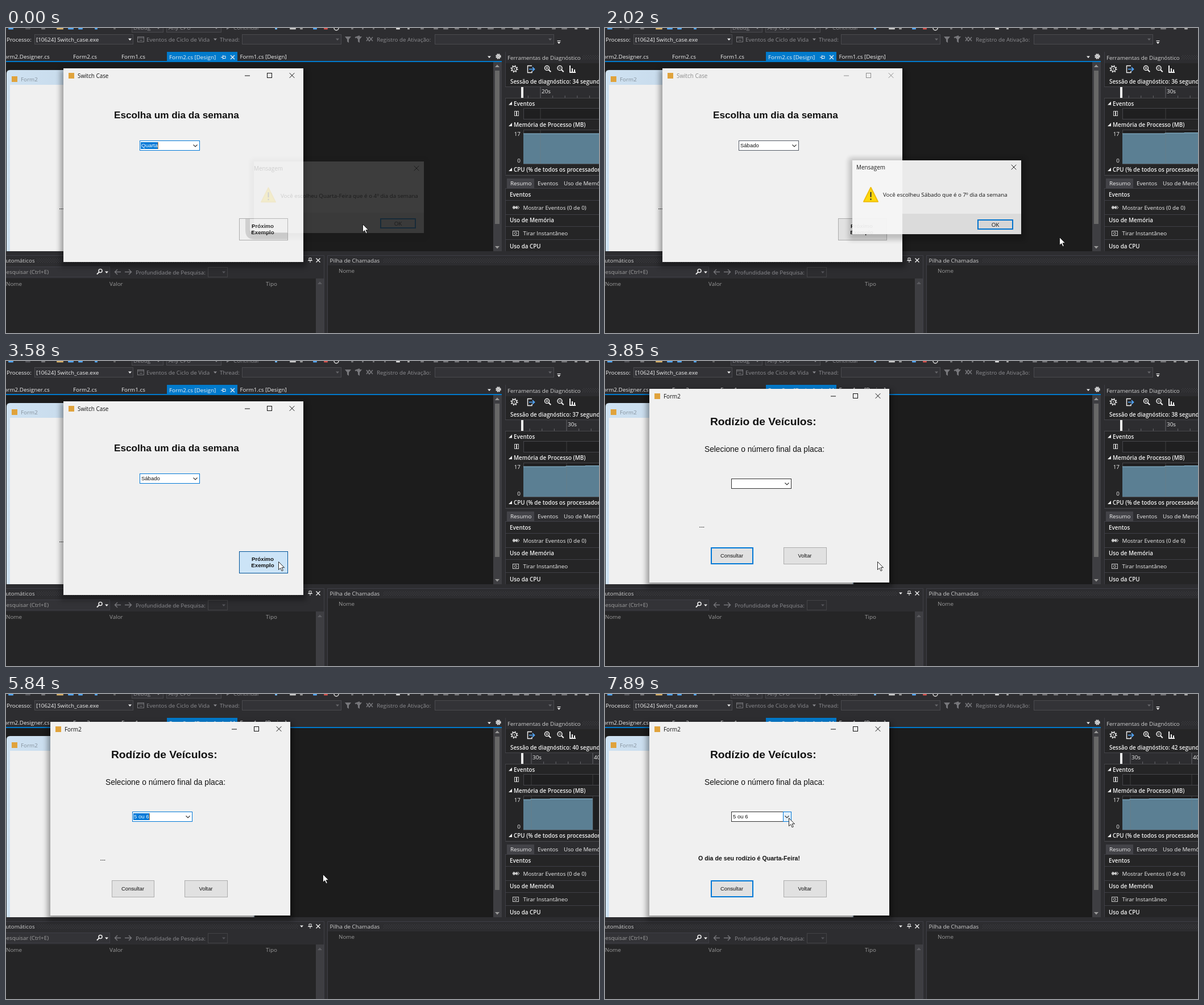
Animation of 1043 by 537 pixels, one loop 8000 ms. Source, as an HTML page:

```html
<!DOCTYPE html>
<html lang="pt">
<head>
<meta charset="utf-8">
<style>
html, body { margin: 0; width: 100%; height: 100%; overflow: hidden; background: #2d2d30; }
svg { display: block; }
text { font-family: "Open Sans", "Noto Sans", sans-serif; white-space: pre; }
.b { font-weight: 600; }
.f { font-family: "Liberation Sans", Arial, sans-serif; }
.fb { font-family: "Liberation Sans", Arial, sans-serif; font-weight: 700; }
</style>
</head>
<body>
<svg id="stage" width="1043" height="537" viewBox="0 0 1043 537">
  <defs>
    <filter id="soft" x="-20%" y="-20%" width="140%" height="140%"><feGaussianBlur stdDeviation="5"/></filter>
    <pattern id="dots" width="4" height="4" patternUnits="userSpaceOnUse">
      <path d="M0 0h1v1h-1zM2 2h1v1h-1z" fill="#46464a"/>
    </pattern>
    <linearGradient id="aero" x2="1"><stop stop-color="#cfe2f2"/><stop offset="1" stop-color="#b4c8da"/></linearGradient>
  </defs>
  <g id="ide"></g>
  <g id="live"></g>
</svg>
<script>
const LOOP = 8000, BLUE = '#0078d7', DIM = '#8c8c90', PALE = '#f1f1f1';
const steps = [0, 120, 240, 390, 510, 660, 780, 930, 1080, 1200, 1320,
  1600, 1720, 1870, 2020, 2140, 2260, 2380, 2500,
  2650, 2800, 2920, 3070, 3190, 3340, 3460, 3580,
  3700, 3850, 4000, 4150, 4290, 4410, 4560, 4680, 4830, 4980, 5130,
  5540, 5690, 5840, 5960, 6110, 6260, 6380, 6530,
  6650, 6770, 6920, 7070, 7220, 7340, 7480, 7610, 7740, 7890];
const pointer = [[0, 627, 345], [240, 585, 327], [660, 350, 214], [780, 336, 206], [930, 334, 208],
  [1080, 328, 245], [1320, 318, 290], [1600, 318, 291], [2020, 799, 368], [2500, 690, 347],
  [2650, 668, 348], [3100, 530, 360], [3580, 479, 353], [3850, 479, 353], [4410, 330, 218],
  [4560, 326, 215], [4680, 326, 213], [5130, 324, 254], [5540, 326, 256], [5840, 557, 317],
  [6530, 236, 343], [6770, 236, 343], [7480, 330, 222], [7890, 323, 218]];
const secondMarks = [930, 1720, 2800, 3850, 4680, 5690, 6650, 7610];
const days = ['Domingo', 'Segunda', 'Terça', 'Quarta', 'Quinta', 'Sexta', 'Sábado'];
const plates = ['1 ou 2', '3 ou 4', '5 ou 6', '7 ou 8', '9 ou 10'];

const rect = (x, y, w, h, fill, more = '') =>
  `<rect x="${x}" y="${y}" width="${w}" height="${h}" fill="${fill}" ${more}/>`;
const box = (x, y, w, h, fill, stroke, sw = 1) =>
  rect(x + sw / 2, y + sw / 2, w - sw, h - sw, fill, `stroke="${stroke}" stroke-width="${sw}"`);
const line = (d, stroke = PALE, sw = 1) => `<path d="${d}" fill="none" stroke="${stroke}" stroke-width="${sw}"/>`;
const shape = (d, fill = PALE) => `<path d="${d}" fill="${fill}"/>`;
const text = (x, y, s, fill = PALE, size = 9.85, cls = '', more = '') =>
  `<text x="${x}" y="${y}" fill="${fill}" font-size="${size}" class="${cls}" ${more}>${s}</text>`;
const middle = 'text-anchor="middle"';
const down = (x, y, fill = PALE) => shape(`M${x - 3} ${y - 1.5}h6l-3 3.5z`, fill);
const up = (x, y, fill = PALE) => shape(`M${x - 4} ${y + 2}h8l-4-4.5z`, fill);
const cross = (x, y, r, c, sw = 1) => line(`M${x - r} ${y - r}l${2 * r} ${2 * r}M${x + r} ${y - r}l${-2 * r} ${2 * r}`, c, sw);
const gear = (x, y, r) => `<circle cx="${x}" cy="${y}" r="${r}" fill="none" stroke="${PALE}" stroke-width="1.4"/>` +
  `<circle cx="${x}" cy="${y}" r="${r + 1.6}" fill="none" stroke="${PALE}" stroke-width="1.8" stroke-dasharray="2 ${(r + 1.6) * Math.PI / 4 - 2}"/>` +
  `<circle cx="${x}" cy="${y}" r="1" fill="${PALE}"/>`;
const lens = (x, y, r = 3.5, dir = 1) => `<circle cx="${x}" cy="${y}" r="${r}" fill="none" stroke="${PALE}" stroke-width="1.5"/>` +
  line(`M${x + dir * r * .7} ${y + r * .7}l${dir * 4} 4`, PALE, 2);
const pin = (x, y) => line(`M${x - 2} ${y - 4}h4v4h-4zM${x - 4} ${y + .5}h8M${x} ${y}v4`);
const appIcon = (x, y) => rect(x, y, 10, 10, '#e0a33c');

function toolbar() {
  const bits = [[4, 9, '#55aaff'], [34, 9, '#55555a'], [62, 7, '#77777a'], [89, 12, '#d9b36c'], [109, 10, '#55aaff'],
    [127, 8, '#55aaff'], [156, 5, '#55aaff'], [189, 4, '#666'], [473, 4, '#75beff'], [499, 11, '#ccc'], [517, 5, '#999'],
    [540, 7, '#55aaff'], [559, 7, '#d9534f'], [607, 4, '#77777a'], [626, 3, '#77777a'], [645, 3, '#77777a'], [665, 3, '#77777a'],
    [686, 7, '#ddd'], [706, 4, '#aaa'], [729, 6, '#77777a'], [752, 8, '#77777a'], [769, 9, '#77777a'], [789, 8, '#77777a'],
    [811, 3, '#77777a'], [829, 7, '#77777a'], [847, 11, '#77777a'], [871, 7, '#77777a'], [891, 12, '#88888b'],
    [911, 9, '#88888b'], [931, 8, '#88888b'], [960, 7, '#77777a'], [977, 10, '#77777a'], [1000, 5, '#999'], [1019, 6, '#aaa']];
  const combo = (x, w, y = 11, h = 18) => box(x, y, w, h, '#333337', '#4a4a4e');
  const funnel = x => shape(`M${x - 5} 15h11l-4 5v6l-3-2v-4z`, '#77777b');
  return bits.map(([x, w, c]) => rect(x, 0, w, 2.5, c, 'rx="1"')).join('') +
    '<circle cx="581" cy="0" r="4" fill="none" stroke="#ddd" stroke-width="1.5"/>' +
    combo(221, 56, -10) + text(224, 3, 'Debug', DIM) + combo(282, 97, -10) + text(286, 3, 'Any CPU', DIM) +
    down(268, 0, DIM) + down(370, 0, DIM) + shape('M388-3l5 3-5 3z', '#77777b') + text(400, 3, 'Continuar', DIM) +
    text(1, 23.5, 'Processo:') + combo(50, 174) + text(53, 23.5, '[10624] Switch_case.exe') + down(218, 20) +
    box(231, 15, 12, 10, 'none', '#77777b') + line('M231 17.5h12M235 21.5h5', '#77777b') +
    text(247, 23.5, 'Eventos de Ciclo de Vida', DIM) + down(368, 20, DIM) + text(376, 23.5, 'Thread:', DIM) +
    combo(415, 175) + down(583, 20, '#66666a') + funnel(601) + funnel(620) + line('M614 17l8-3', '#77777b', 2) +
    line('M634 16l5 7 6-7M634 23l5-7 6 7', '#77777b', 1.5) + text(652, 23.5, 'Registro de Ativação:', DIM) +
    combo(754, 210) + down(957, 20, '#66666a') + line('M969.5 22.5h6', PALE) + down(972.5, 26);
}

function editor() {
  return rect(0, 60, 857, 333, '#1c1c1c') + rect(0, 58, 872, 2, '#007acc') +
    text(-3.5, 54, 'orm2.Designer.cs') + text(118, 54, 'Form2.cs') + text(203, 54, 'Form1.cs') +
    rect(283, 42, 124, 17, '#007acc') + text(287, 54.5, 'Form2.cs [Design]') +
    line('M378 51.5h3M381.5 48v7M382 49.5h4v4h-4') + cross(398.5, 51.5, 3.5, PALE, 1.3) +
    text(411.5, 54, 'Form1.cs [Design]') + down(850, 51) + gear(866, 50, 2.2) +
    rect(857, 60, 15, 333, '#3e3e42') + rect(860, 75, 8, 270, '#686868') + up(864, 67, '#999') +
    shape('M860 384h8l-4 4.5z', '#999') +
    '<path d="M1 393V80q0-6 6-6h424q6 0 6 6v313z" fill="url(#aero)"/>' +
    rect(7, 100, 428, 293, '#f0f0f0') + appIcon(10, 85) + text(26, 94, 'Form2', '#85919c') +
    line('M94 318.5h7', '#333', 1).replace('/>', ' stroke-dasharray="2 1"/>');
}

function bottomPanels() {
  return rect(0, 400, 560, 137, '#2d2d30') + rect(0, 458, 545, 79, '#252526') + rect(0, 441, 545, 17, '#252526') +
    rect(566, 418, 477, 119, '#252526') + line('M0 400.5h559.5v137M565.5 537v-136.5h478', '#3f3f46') +
    text(-7, 413, 'Automáticos', '#d0d0d0') + rect(54, 406, 460, 7, 'url(#dots)') + down(520, 409) +
    pin(535, 409) + cross(549, 409, 3.5, PALE, 1.4) +
    box(-2, 420, 185, 19, '#333337', '#3f3f46') + text(-5.5, 433, 'Pesquisar (Ctrl+E)', '#a0a0a0') +
    lens(166, 427.5, 3, -1) + down(177, 430) +
    line('M202 429.5h-10M196 425l-4.500 4.500 4.500 4.500M209 429.500h11M216 425l4.500 4.500-4.500 4.500', '#77777b', 1.4) +
    text(228, 433.5, 'Profundidade de Pesquisa:', DIM) + box(355, 421, 35, 18, '#2d2d30', '#434346') + down(383, 430, '#55555a') +
    text(0, 453.5, 'Nome', '#999') + text(182, 453.5, 'Valor', '#999') + text(457, 453.5, 'Tipo', '#999') +
    rect(545, 441, 14, 96, '#3e3e42') + up(552, 449, '#5c5c60') +
    text(569.5, 413, 'Pilha de Chamadas', '#d0d0d0') + rect(664, 406, 379, 7, 'url(#dots)') + text(585, 430.5, 'Nome', '#999');
}

function diagnostics() {
  const head = (y, s) => shape(`M890 ${y - 3.5}v6h-6z`) + text(893, y + 3.5, s, PALE, 9.85, 'b');
  return rect(878, 42, 165, 351, '#252526') + rect(878, 42, 165, 20, '#2d2d30') + line('M878.5 42v351', '#3f3f46') +
    text(882, 55.5, 'Ferramentas de Diagnóstico', '#d0d0d0') + rect(1014, 48, 29, 7, 'url(#dots)') +
    gear(894, 72, 4) + line('M925 66.500h-7.500v12h7.500v-3', PALE, 1.4) + line('M920 72.500h9M926 69l3.500 3.500-3.500 3.500', '#55aaff', 1.7) +
    lens(951.5, 70.5, 4) + line('M949.500 70.500h4M951.500 68.500v4') + lens(974, 70.5, 4) + line('M972 70.500h4') +
    line('M992 66v12M996 71v7.500M1000 73v5.500M991 78h11', PALE, 2) +
    rect(878, 104, 165, 20, '#2d2d30') + line('M878 103.500h165M878 123.500h165', '#46464a') + rect(906, 104, 4, 19, PALE) +
    head(133, 'Eventos') + box(894, 146, 8, 9, 'none', '#ccc') + line('M898 147v7', '#ccc', 2) +
    box(910, 141, 140, 20, '#1f1f20', '#46464a') + head(170.5, 'Memória de Processo (MB)') +
    text(905, 190, '17', PALE, 9.85, '', 'text-anchor="end"') + text(905, 237, '0', PALE, 9.85, '', 'text-anchor="end"') +
    box(910, 179, 140, 61, '#1f1f20', '#46464a') + head(249.500, 'CPU (% de todos os processadores)') +
    rect(878, 258, 165, 24, '#2d2d30') + line('M878 259.500h165', '#46464a') + rect(881, 265, 48, 17, '#434348') +
    text(887, 277, 'Resumo') + text(935, 277, 'Eventos') + text(981, 277, 'Uso de Memória') +
    line('M878 282.500h165M878 303.500h165M878 328.500h165M878 349.500h165M878 372.500h165', '#3f3f46') +
    text(886, 297, 'Eventos', PALE, 9.85, 'b') + shape('M891 316l3-3 3 3-3 3zM895 316l3-3 3 3-3 3z', '#ccc') +
    line('M893 313l-2 3 2 3M900 313l3 3-3 3', '#ccc') + text(909.500, 319.500, 'Mostrar Eventos (0 de 0)') +
    text(886, 342, 'Uso de Memória', PALE, 9.85, 'b') + box(891, 357, 11, 9, 'none', '#ccc') +
    '<circle cx="896.500" cy="361.500" r="2" fill="none" stroke="#ccc"/>' + text(909.500, 365, 'Tirar Instantâneo') +
    text(886, 387.500, 'Uso da CPU', PALE, 9.85, 'b');
}

// Timeline, memory graph and session clock.
function session(s) {
  const seconds = 34 + secondMarks.filter(m => m <= s).length;
  const shift = s < 660 ? 0 : s < 5690 ? 62 : 124;
  const end = shift === 62 && s < 1080 ? 1038 : shift === 124 && s < 6110 ? 1032 : 1043;
  const rise = shift ? 1081 - shift : 1043;
  let out = text(887, 97.5, `Sessão de diagnóstico: ${seconds} segundos`, PALE, 9.85, 'b');
  const area = shift ? `M910 186H${rise - 34}V185H${rise}V184.500H${end}` : 'M910 186H1043';
  out += shape(`${area}V239H910z`, '#5b7f93') + line(area, '#8fbdd6');
  for (let sec = 12; sec <= 50; sec += 2) {
    const x = 940 + (sec - 20) * 10.8 - shift;
    if (x < 911 || x > 1043) continue;
    const major = sec % 10 === 0;
    out += line(`M${x} ${major ? 104 : 119}V123`, '#66666a');
    if (major) out += line(`M${x} 142v18M${x} 180v59`, 'rgba(120,120,125,.35)') + text(x + 2, 115, sec + 's');
  }
  return out;
}

function frame(x, y, title, active) {
  const ink = active ? '#111' : '#8e8e8e', cy = y + 12.5;
  return rect(x - 5, y + 2, 432, 348, '#000', 'opacity=".35" filter="url(#soft)"') + rect(x, y, 422, 341, '#f0f0f0') +
    appIcon(x + 9, y + 8) + text(x + 25, y + 16.5, title, ink, 9.9) +
    line(`M${x + 319} ${cy + .5}h9`, ink) + box(x + 358, cy - 4.5, 9, 9, 'none', ink) + cross(x + 402, cy, 4.3, ink);
}

function combo(x, y, value, { edge = BLUE, selected, hover, caret } = {}) {
  let out = box(x, y, 106, 18, '#fff', edge);
  if (selected) out += rect(x + 2, y + 3, selected, 12, BLUE) + line(`M${x + selected + 2.5} ${y + 3}v12`, '#e08a3c');
  if (caret) out += line(`M${x + 3.5} ${y + 3}v11`, '#000');
  if (hover) out += box(x + 91, y, 15, 18, '#e5f1fb', BLUE);
  return out + text(x + 3, y + 12.3, value, selected ? '#fff' : '#111', 9.5, 'f') +
    line(`M${x + 94.5} ${y + 7.5}l3.500 3.500 3.500-3.500`, '#333', 1.1);
}

function dropList(x, y, items, hot, shownRows = items.length) {
  const row = 11.4, h = shownRows * row, top = (shownRows - items.length) * row;
  const rows = items.map((s, i) => {
    const ry = top + i * row;
    return (i === hot ? rect(0, ry, 106, row, BLUE) : '') + text(3, ry + 9, s, i === hot ? '#fff' : '#111', 9.5, 'f');
  });
  return rect(x + 5, y + 5, 103, h, '#777', 'opacity=".7"') + box(x, y - 1, 106, h + 2, '#fff', '#555') +
    `<svg x="${x + .5}" y="${y}" width="105" height="${h}">${rows.join('')}</svg>`;
}

function button(x, y, w, h, label, look = 'plain') {
  const [fill, edge, sw] = { plain: ['#e1e1e1', '#adadad', 1], focus: ['#e1e1e1', BLUE, 2],
    hover: ['#e5f1fb', BLUE, 1], down: ['#cce4f7', '#005499', 1] }[look];
  return box(x, y, w, h, fill, edge, sw) + (label ? text(x + w / 2 - .5, y + h / 2 + 3.3, label, '#111', 9.4, 'f', middle) : '');
}

function dialog(x, y, w, h, pad, message, opacity) {
  const foot = Math.max(0, 523 - x), iy = y + h * .36, ix = x + pad + 12;
  return `<g opacity="${opacity}">` + rect(x - 6, y - 4, w + 12, h + 14, '#000', 'opacity=".22" filter="url(#soft)"') +
    rect(x, y, w, h, '#f6f6f6') + rect(x + foot, y + h - 36, w - foot, 36, '#e6e6e6') +
    text(x + pad, y + 16, 'Mensagem', '#111', 9.9) + cross(x + w - 13, y + 12, 4.3, '#222') +
    `<path d="M${ix + 13.5} ${iy + 1}l12.500 25h-25z" fill="#ffd800" stroke="#f0bc00" stroke-width="2" stroke-linejoin="round"/>` +
    line(`M${ix + 13.5} ${iy + 9}v9M${ix + 13.5} ${iy + 20.5}v2.500`, '#222', 2) +
    text(x + pad + 47, y + 64, message, '#111', 9.78) +
    box(x + w - 77, y + h - 26, 63, 18, '#e1e1e1', BLUE, 2) + text(x + w - 45.5, y + h - 13.5, 'OK', '#111', 9.8, '', middle) + '</g>';
}

function weekForm(s) {
  const modal = s >= 1720 && s < 2650, fading = s < 120;
  const look = s >= 3580 ? 'down' : s >= 3460 ? 'hover' : 'plain';
  let out = frame(101, 71, 'Switch Case', !modal) + text(190, 158.5, 'Escolha um dia da semana', '#111', 17.2, 'fb');
  out += s < 1600
    ? combo(235, 198, 'Quarta', { selected: 30, hover: s >= 660 })
    : combo(235, 198, 'Sábado', { edge: modal ? '#555b66' : BLUE, selected: s < 1720 ? 33 : 0 });
  out += button(410, 335, 86, 39, '', look);
  if (fading) out += rect(411, 336, 84, 37, '#efefef') + shape('M421 336h8v19q0 5 5 5h61v12h-58q-16 0-16-16z', '#d0d0d0');
  out += text(451.5, 352, 'Próximo', '#111', 9.7, 'fb', middle) + text(451.5, 363.3, 'Exemplo', '#111', 9.7, 'fb', middle);
  if (s >= 930 && s < 1600) {
    const hot = s < 1080 ? 3 : s < 1200 ? 2 : s < 1320 ? 4 : 6;
    out += dropList(235, 217, days, hot, s < 1080 ? 4 : 7);
  }
  const said = 'Você escolheu Sábado que é o 7º dia da semana';
  if (fading) out += dialog(436, 235, 299, 126, 0, 'Você escolheu Quarta-Feira que é o 4º dia da semana', .15);
  if (modal && s >= 1870) out += dialog(435, 233, 297, 130, 7, said, s < 2020 ? .5 : s < 2140 ? .95 : 1);
  if (s >= 2650 && s < 2800) out += dialog(438, 235, 290, 126, 0, said, .15);
  return out;
}

function plateForm(s) {
  const chosen = s >= 5540, answered = s >= 6650, open = s >= 4560 && s < 5540;
  const arrow = (s >= 4410 && s < 5690) || s >= 7480;
  const editing = s >= 4410 && !chosen;
  const look = s >= 6380 && s < 6650 ? 'hover' : s < 5540 || answered ? 'focus' : 'plain';
  let out = frame(78, 49, 'Form2', true) + text(185, 112.8, 'Rodízio de Veículos:', '#111', 19.2, 'fb') +
    text(175, 160.3, 'Selecione o número final da placa:', '#111', 13.75, 'f') +
    combo(222, 207, chosen ? '5 ou 6' : '', { edge: chosen && !answered ? BLUE : '#333',
      selected: chosen && !answered ? 28 : 0, hover: arrow, caret: editing }) +
    (answered ? text(164, 293, 'O dia de seu rodízio é Quarta-Feira!', '#111', 10.6, 'fb') : text(165.5, 295, '---', '#111', 9.5, 'f')) +
    button(186, 328, 75, 30, 'Consultar', look) + button(314, 328, 76, 30, 'Voltar');
  if (open) {
    const hot = s < 4830 ? -1 : s < 4980 ? 0 : s < 5130 ? 1 : 2;
    out += dropList(222, 225, plates, hot, s < 4680 ? 2.8 : 5);
  }
  return out;
}

function cursor(s) {
  const i = Math.max(1, pointer.findIndex(p => p[0] >= s));
  const [t0, x0, y0] = pointer[i - 1], [t1, x1, y1] = pointer[i];
  const k = (s - t0) / (t1 - t0);
  return `<path transform="translate(${x0 + (x1 - x0) * k} ${y0 + (y1 - y0) * k})" d="M.5.500v14l3.200-3 2.400 5.200 2.200-1-2.300-5h4.500z" fill="#fff" stroke="#111" stroke-width=".9"/>`;
}

const live = document.getElementById('live');
document.getElementById('ide').innerHTML = toolbar() + editor() + bottomPanels() + diagnostics();
const start = performance.now();
let shown = -1;
function render() {
  const t = (performance.now() - start) % LOOP;
  const s = steps.findLast(m => m <= t);
  if (s !== shown) {
    live.innerHTML = session(s) + (s < 3850 ? weekForm(s) : plateForm(s)) + cursor(s);
    shown = s;
  }
  requestAnimationFrame(render);
}
render();
</script>
</body>
</html>
```
